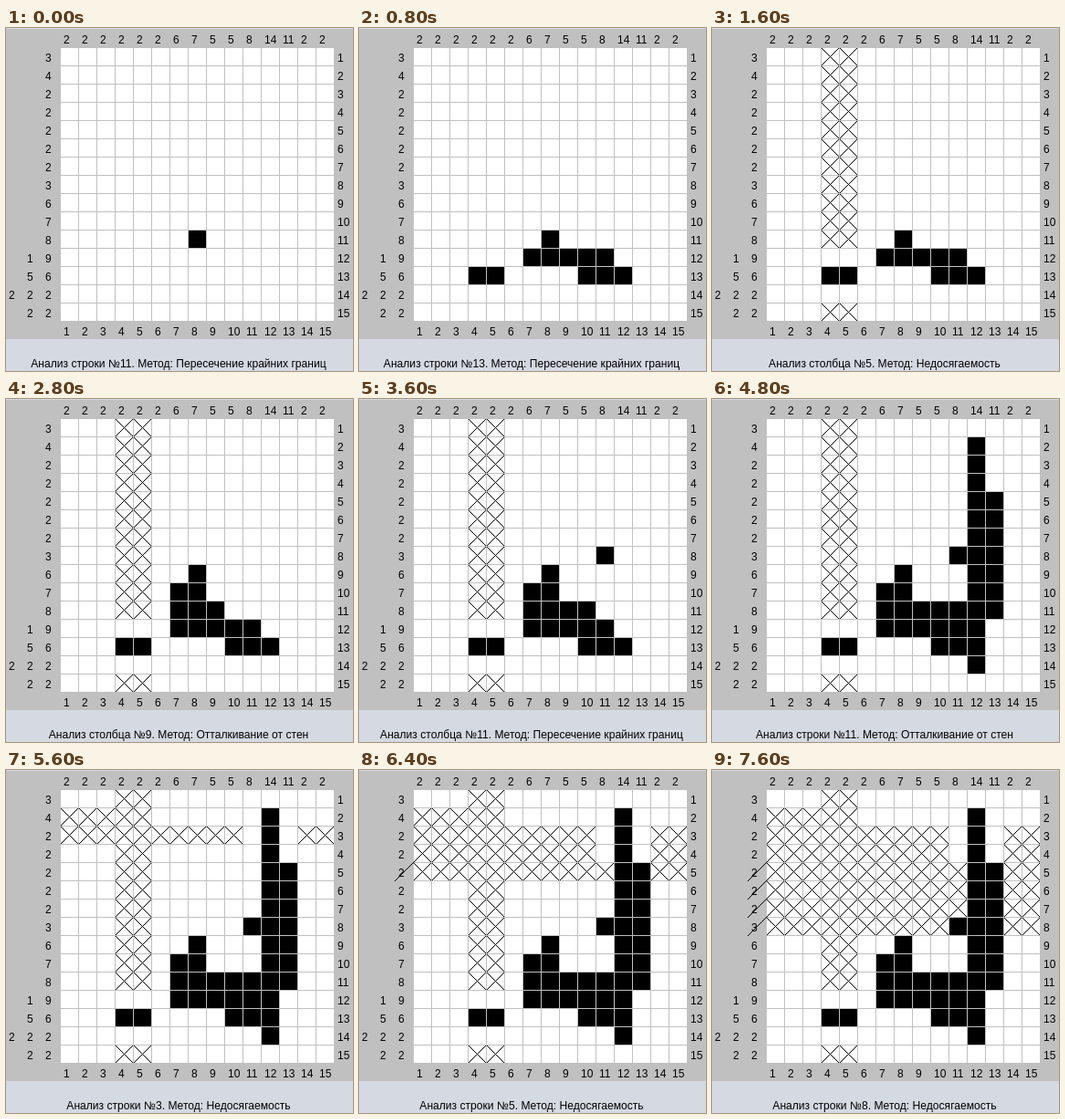
An HTML page for the animation above (8 s loop, 380 by 376 pixels).

```html
<!DOCTYPE html>
<html lang="ru">
<head>
<meta charset="utf-8">
<style>
  html, body { margin: 0; width: 100%; height: 100%; overflow: hidden; background: #d5d9e2; }
  svg { display: block; width: 380px; height: 376px; }
  text { font: 12px "Liberation Sans", Arial, sans-serif; fill: #000; }
  #caption { font-size: 12.1px; text-anchor: middle; }
  .crisp { shape-rendering: crispEdges; }
  .mark { stroke: #000; stroke-width: 1; fill: none; }
</style>
</head>
<body>
<svg id="stage" viewBox="0 0 380 376">
  <rect y="1" width="380" height="340" fill="#c0c0c0"/>
  <g id="cells" class="crisp"></g>
  <g id="labels"></g>
  <g id="strikes" class="crisp"></g>
  <text id="caption" x="189" y="372"></text>
</svg>
<script>
const STEP = 400, SIZE = 15, CELL = 20, LEFT = 60, TOP = 22;
const CROSS = 'Пересечение крайних границ';
const REACH = 'Недосягаемость';
const PUSH = 'Отталкивание от стен';

// line kind, line number, method, filled ranges, crossed ranges, line solved
const steps = [
  ['row', 11, CROSS, '8'],
  ['row', 12, CROSS, '7-11'],
  ['row', 13, CROSS, '4-5 10-12'],
  ['col', 4, REACH, '', '1-11 15'],
  ['col', 5, REACH, '', '1-11 15'],
  ['col', 7, PUSH, '10-12'],
  ['col', 8, PUSH, '9-12'],
  ['col', 9, PUSH, '11-12'],
  ['col', 10, PUSH, '11-13'],
  ['col', 11, CROSS, '8'],
  ['col', 12, CROSS, '2-14'],
  ['col', 13, CROSS, '5-11'],
  ['row', 11, PUSH, '7-13'],
  ['row', 2, REACH, '', '1-5'],
  ['row', 3, REACH, '', '1-10 14-15'],
  ['row', 4, REACH, '', '1-10 14-15'],
  ['row', 5, REACH, '', '1-11 14-15', true],
  ['row', 6, REACH, '', '1-11 14-15', true],
  ['row', 7, REACH, '', '1-11 14-15', true],
  ['row', 8, REACH, '', '1-10 14-15', true]
];
const topClues = '2 2 2 2 2 2 6 7 5 5 8 14 11 2 2'.split(' ');
const sideClues = '3,4,2,2,2,2,2,3,6,7,8,1 9,5 6,2 2 2,2 2'.split(',').map(s => s.split(' '));

const $ = id => document.getElementById(id);
const cells = $('cells'), labels = $('labels'), strikes = $('strikes'), caption = $('caption');
const left = c => LEFT + CELL * (c - 1);
const top_ = r => TOP + CELL * (r - 1);

function add(parent, tag, attrs, text) {
  const el = document.createElementNS('http://www.w3.org/2000/svg', tag);
  for (const k in attrs) el.setAttribute(k, attrs[k]);
  if (text !== undefined) el.textContent = text;
  return parent.appendChild(el);
}

function expand(ranges) {
  const out = [];
  for (const part of (ranges || '').split(' ').filter(Boolean)) {
    const [a, b = a] = part.split('-').map(Number);
    for (let i = a; i <= b; i++) out.push(i);
  }
  return out;
}

const label = (x, y, text) => add(labels, 'text', { x, y }, text);

for (let i = 1; i <= SIZE; i++) {
  const x = left(i), y = top_(i);
  label(x + 3, 17, topClues[i - 1]);
  label(x + 3, 337, i);
  label(363, y + 15, i);
  const clues = sideClues[i - 1];
  clues.forEach((n, k) => label(43 - CELL * (clues.length - 1 - k), y + 15, n));
  for (let c = 1; c <= SIZE; c++)
    add(cells, 'rect', { x: left(c), y, width: 19, height: 19, fill: '#fff' });
}

// marks appear with the step that first sets them
const marks = [], seen = new Set();
steps.forEach(([kind, n, , filled, crossed, solved], at) => {
  const put = (i, isFilled) => {
    const [r, c] = kind === 'row' ? [n, i] : [i, n];
    const key = r * 100 + c;
    if (seen.has(key)) return;
    seen.add(key);
    const x = left(c), y = top_(r);
    const el = isFilled
      ? add(cells, 'rect', { x, y, width: 19, height: 19 })
      : add(cells, 'path', { class: 'mark', d: `M${x} ${y}l19 19M${x + 19} ${y}l-19 19` });
    marks.push({ at, el });
  };
  expand(filled).forEach(i => put(i, true));
  expand(crossed).forEach(i => put(i, false));
  if (solved) {
    const el = add(strikes, 'path', { class: 'mark', d: `M39 ${top_(n) + 20}l21 -21` });
    marks.push({ at, el });
  }
});

let shown = -1;
function show(now) {
  const s = Math.floor(now / STEP) % steps.length;
  if (s === shown) return;
  shown = s;
  for (const m of marks) m.el.style.display = m.at <= s ? '' : 'none';
  const [kind, n, method] = steps[s];
  caption.textContent = `Анализ ${kind === 'row' ? 'строки' : 'столбца'} №${n}. Метод: ${method}`;
}

show(0);
const start = performance.now();
requestAnimationFrame(function tick() {
  show(performance.now() - start);
  requestAnimationFrame(tick);
});
</script>
</body>
</html>
```
